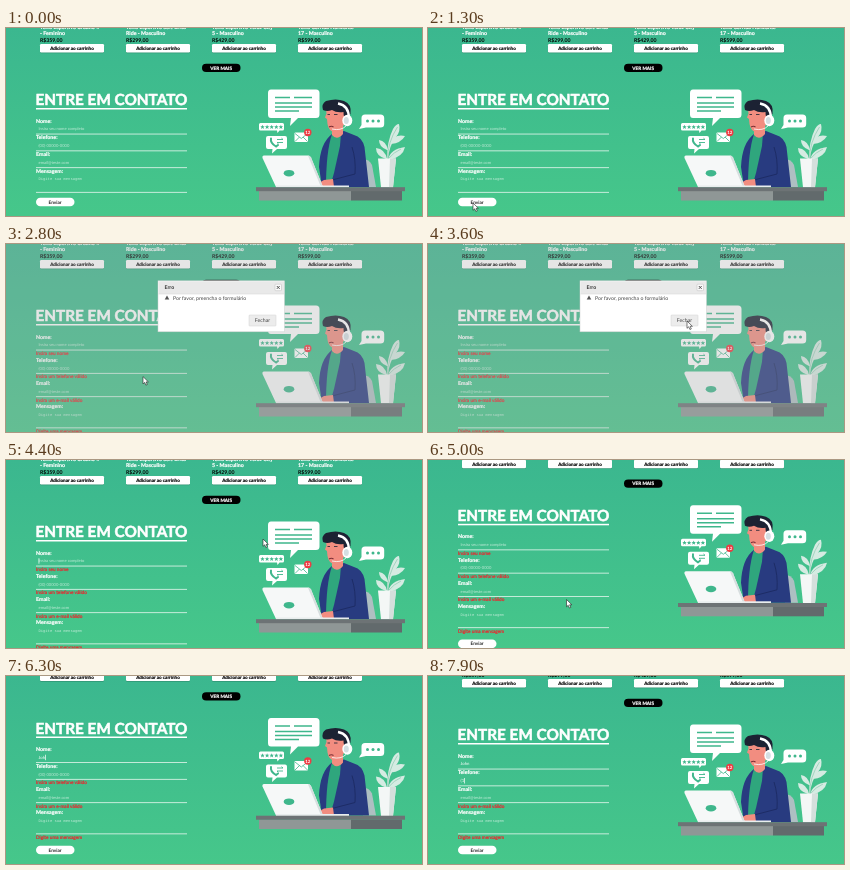
Write an HTML page that moves like this. It is 416 px wide and 188 px high and loops after 8000 ms.

```html
<!DOCTYPE html>
<html lang="pt-BR">
<head>
<meta charset="utf-8">
<title>Entre em contato</title>
<style>
  html, body { margin: 0; height: 100%; overflow: hidden; }
  svg { display: block; width: 416px; height: 188px; font-family: Lato, sans-serif; text-rendering: geometricPrecision; }
  .b { font-weight: 700; }
  .mid { text-anchor: middle; }
  .white { fill: #fff; }
  .green { fill: #3fb78c; }
  .skin { fill: #f28d80; }
  .navy { fill: #283b80; }
  .hair { fill: #1c2233; }
  .title { fill: #fff; stroke: #fff; stroke-width: .55; font-size: 15.3px; font-weight: 700; }
  .hint { fill: #bfead7; font-size: 4.1px; }
  .typed { fill: #fff; font-size: 4.3px; }
  .error { fill: #f0222b; stroke: #f0222b; stroke-width: .2; font-size: 4.75px; }
  .label { fill: #fff; stroke: #fff; stroke-width: .2; font-size: 5.3px; font-weight: 700; }
  .mono { font: 3.8px "Liberation Mono", monospace; }
</style>
</head>
<body>
<svg viewBox="0 0 416 188">
  <defs>
    <linearGradient id="bg" x2="0" y2="1">
      <stop stop-color="#3bb78f"/><stop offset="1" stop-color="#46c78a"/>
    </linearGradient>
  </defs>
  <rect width="416" height="188" fill="url(#bg)"/>

  <g id="page">
    <g id="products"></g>
    <rect x="196" y="35.7" width="38.5" height="8.3" rx="4.1"/>
    <text class="b mid white" x="215.2" y="41.6" font-size="4.7" stroke="#fff" stroke-width=".2">VER MAIS</text>
    <text class="title" x="29.5" y="77">ENTRE EM CONTATO</text>
    <rect class="white" x="30" y="80" width="151" height="1.5"/>

    <g id="art">
      <!-- chat bubbles -->
      <path class="white" d="M265 61.5h45q3.5 0 3.500 3.500v21.500q0 3.500-3.500 3.500h-18l-8 8 1-8h-20q-3 0-3-3.500V65q0-3.500 3-3.500z"/>
      <path d="M269 69.500h15m4 0h18M269 75h37M269 79h37M269 83h24" stroke="#3fb78c" stroke-width="1.600" fill="none"/>
      <path class="white" d="M254.500 95h22q1.500 0 1.500 1.500v4.500q0 1.500-1.500 1.500h-3l-2 2.500-.5-2.500h-16.500q-1.500 0-1.500-1.500v-4.500q0-1.500 1.500-1.500z"/>
      <g id="stars" class="green"></g>
      <path class="white" d="M262 108h17q2 0 2 2v9q0 2-2 2h-8l-5 4.500.5-4.500h-4.500q-2 0-2-2v-9q0-2 2-2z"/>
      <path d="M265 110.500q-1 4.500 5 8l2-1.500" fill="none" stroke="#3fb78c" stroke-width="2" stroke-linecap="round"/>
      <path d="M271 111.500h6l-1.500-1.300M277 114.500h-6l1.500 1.300" fill="none" stroke="#3fb78c" stroke-width=".9"/>
      <rect class="white" x="288.500" y="104.500" width="13.500" height="9.500" rx="1"/>
      <path d="M289 105.500l6.300 5 6.300-5M289 113.500l4.500-4.500M301.500 113.500l-4.500-4.500" fill="none" stroke="#3fb78c" stroke-width=".8"/>
      <circle cx="301.800" cy="104.500" r="3.700" fill="#ed3b43"/>
      <text class="b mid white" x="301.800" y="106.100" font-size="4.400">12</text>
      <path class="white" d="M359 86.500h15.500q3.700 0 3.700 3.500v6q0 3.500-3.700 3.500H360l-7 1.500 2.500-4v-7q0-3.500 3.500-3.500z"/>
      <g class="green"><circle cx="361.500" cy="93" r="1.500"/><circle cx="367" cy="93" r="1.500"/><circle cx="372.500" cy="93" r="1.500"/></g>

      <!-- chair and plant -->
      <path fill="#aebfc2" d="M354 131q9-1 12 6l4 22h-13z"/>
      <g fill="#d5ebe2">
        <path d="M381 131q0-18 6-30 3-5 6-5 2 7-3 13-7 9-8 22z"/>
        <path d="M382 132q2-11 17-13-2 10-16 13z"/>
        <path d="M380 131q-10-3-10-11 9 1 11 11z"/>
        <path d="M381 122q-8-3-8-10 7 1 9 10z"/>
        <path d="M385 114q3-8 14-6-4 7-14 8z"/>
      </g>
      <path d="M381.500 132q0-18 10-33M382 131q6-7 13-10" fill="none" stroke="#8fc9b1" stroke-width=".7"/>
      <path d="M372 130.500h18l-3 29h-12z" fill="#f4f7f6"/>
      <path d="M384 130.500h6l-3 29h-4z" fill="#d5dfdc"/>

      <!-- person -->
      <path class="navy" d="M326 106l12-3 10 4q8 2 10.500 12l4.500 40h-47l-3-20q1-24 13-33z"/>
      <path fill="#2fa67d" d="M326 106l9-1-1 13-6 27-4 14h-4q0-35 6-53z"/>
      <path class="skin" d="M326 98h11v8q-6 7-11 1z"/>
      <path class="skin" d="M320 81h19.500v12q-4 11-11 11-6-1-7-8l-.5-5-2-1.500 1.500-4z"/>
      <path class="hair" d="M317 82q-2-6 3-9 10-3 18 0 8 3 6.500 13l-4.500 5q-2.500-1-2.500-7-7 1-11.500-2-5 2-9 0z"/>
      <path d="M323 99q2.500-1.500 4.500 0" fill="none" stroke="#7c2f35" stroke-width="1.100"/>
      <path d="M321.500 86.500h2.500m4 0h3.500" stroke="#1c2233" stroke-width=".8"/>
      <path d="M332 75.500q11 2 11 15" fill="none" stroke="#fff" stroke-width="2.300"/>
      <ellipse class="white" cx="341.300" cy="92.500" rx="5" ry="5.700"/>
      <ellipse cx="340.300" cy="92.500" rx="2.500" ry="3.500" fill="#d4dfe3"/>
      <path d="M340 98q-5 5-14 3" fill="none" stroke="#fff" stroke-width=".8"/>
      <path d="M346 119q4 12 3 27l-23 6" fill="none" stroke="#1d2c66" stroke-width="1"/>
      <path class="skin" d="M327 151l-9 1-7 4v3h17z"/>

      <!-- laptop and desk -->
      <path fill="#f6f8f8" d="M258 127.500h44q2 0 3 2l12 29.500h-47l-13.500-29q-.5-2.500 1.500-2.500z"/>
      <path fill="#d7dedf" d="M302 127.500q2 0 3 2l12 29.500h-2l-12.500-30z"/>
      <ellipse class="green" cx="283" cy="145.200" rx="5.300" ry="3.300"/>
      <rect fill="#e9eeee" x="270" y="157.500" width="73" height="2"/>
      <rect fill="#8f9796" x="253" y="163" width="92" height="9.500"/>
      <rect fill="#626a6c" x="345" y="163" width="51" height="9.500"/>
      <rect fill="#6d7375" x="250" y="159.200" width="149" height="4"/>
    </g>

    <g id="form"></g>
    <g id="send">
      <rect class="white" x="30" y="169.700" width="38.500" height="8.600" rx="4.300"/>
      <text class="b mid" x="49" y="175.600" font-size="4.700" fill="#222">Enviar</text>
    </g>
    <rect id="caret" class="white" width=".7" height="5.500"/>
  </g>

  <g id="modal">
    <rect width="416" height="188" fill="#aaa" opacity=".3"/>
    <rect x="152" y="36.800" width="126.500" height="51" fill="#fff" stroke="#c9cfcd" stroke-width=".5"/>
    <rect x="152.500" y="37.300" width="125.500" height="12.700" fill="#e9e9e9"/>
    <path d="M152.500 50h125.500" stroke="#d2d2d2" stroke-width=".5"/>
    <text class="b" x="158.500" y="45.300" font-size="5.200" fill="#333">Erro</text>
    <rect x="269" y="40.200" width="6.500" height="6.500" rx=".8" fill="#fafafa" stroke="#bbb" stroke-width=".5"/>
    <g id="icons">
      <path d="M270.800 42l2.900 2.900m0-2.900l-2.900 2.900" stroke="#444" stroke-width=".9"/>
      <path d="M161 51.500l2.300 4h-4.600z" fill="#555"/>
    </g>
    <text x="167" y="56.200" font-size="5.200" fill="#444">Por favor, preencha o formulário</text>
    <rect x="243" y="71" width="27" height="11" rx=".8" fill="#ececec" stroke="#d0d0d0" stroke-width=".5"/>
    <text class="mid" x="256.500" y="78.300" font-size="5.200" fill="#444">Fechar</text>
  </g>

  <path id="arrow" d="M0 0v7.300l1.700-1.500 1.200 2.700 1.400-.6-1.200-2.600h2.300z" fill="#fff" stroke="#222" stroke-width=".6"/>
</svg>
<script>
const LOOP = 8000, STEP = 100, ERROR_HEIGHT = 6.5, BLINK = 530;
const OPENED = 1900, CLOSED = 4000;
const $ = id => document.getElementById(id);
const text = (x, y, cls, str = '') => `<text x="${x}" y="${y}" class="${cls}">${str}</text>`;

const products = [
  ['Tênis Esportivo Urbano 4', '- Feminino', '359'],
  ['Tênis Esportivo Soft Brisa', 'Ride - Masculino', '299'],
  ['Tênis Esportivo Veloz City', '5 - Masculino', '429'],
  ['Tênis Corrida Horizonte', '17 - Masculino', '599'],
];
$('products').innerHTML = products.map(([name, kind, price], i) => `
  <g transform="translate(${34 + 86 * i})">
    ${text(0, 0.7, 'label', name)}${text(0, 7.2, 'label', kind)}
    <text class="b" y="13.7" font-size="5.2">R$${price},00</text>
    <rect y="16.8" width="64" height="8.4" rx="1.2" opacity=".2"/>
    <rect class="white" y="16" width="64" height="8.5" rx="1.2"/>
    <text class="b mid" x="32" y="22" font-size="4.6" stroke="#000" stroke-width=".15">Adicionar ao carrinho</text>
  </g>`).join('');

const star = 'M0-2.200l.6 1.500h1.600l-1.200 1 .5 1.600-1.500-1-1.500 1 .5-1.600-1.200-1h1.600z';
$('stars').innerHTML = [0, 1, 2, 3, 4].map(i =>
  `<path d="${star}" transform="translate(${256.5 + 4.6 * i} 99)"/>`).join('');

// top: offset from the first field; line: position of the underline
const fields = [
  { top: 0, line: 106, label: 'Nome:', hint: 'Insira seu nome completo', error: 'Insira seu nome' },
  { top: 16.8, line: 106, label: 'Telefone:', hint: '(00) 00000-0000', error: 'Insira um telefone válido' },
  { top: 33.6, line: 106, label: 'Email:', hint: 'email@teste.com', error: 'Insira um e-mail válido' },
  { top: 50, line: 114.3, label: 'Mensagem:', hint: 'Digite sua mensagem', error: 'Digite uma mensagem' },
];
$('form').innerHTML = fields.map((f, i) => `
  <g>
    ${text(30, 94.7, 'label', f.label)}
    ${text(32.5, 102.3, i === 3 ? 'hint mono' : 'hint', f.hint)}
    ${text(32.5, 102.4, 'typed')}
    <rect x="30" y="${f.line - 0.4}" width="151" height=".9" fill="#d3f0e3"/>
    ${text(30, f.line + 5, 'error', f.error)}
  </g>`).join('');
fields.forEach((f, i) => {
  f.node = $('form').children[i];
  for (const part of ['hint', 'typed', 'error']) f[part] = f.node.querySelector('.' + part);
});

const show = (node, on) => node.setAttribute('visibility', on ? 'inherit' : 'hidden');
const move = (node, x, y) => node.setAttribute('transform', `translate(${x} ${y})`);

// Interpolates [time, ...values] keys
function track(keys, t) {
  if (t <= keys[0][0]) return keys[0].slice(1);
  const i = keys.findIndex(k => k[0] > t);
  if (i < 0) return keys.at(-1).slice(1);
  const a = keys[i - 1], b = keys[i], p = (t - a[0]) / (b[0] - a[0]);
  return a.slice(1).map((v, j) => v + (b[j + 1] - v) * p);
}

const pointer = [
  [500, -6, 112], [900, 30, 146], [1300, 45, 175], [2400, 45, 175], [2900, 160, 122],
  [3300, 259, 77], [3700, 259, 77], [4400, 257, 79], [4600, 240, 88], [5000, 138.5, 139.5],
  [5400, 80, 100], [5700, 46, 75],
];
const wheel = [[4600, 0], [4800, 4], [5000, 16.2], [5300, 4 * ERROR_HEIGHT]];
const keystrokes = [
  [[6000, 'J'], [6100, 'Jo'], [6300, 'Joh'], [6500, 'John']],
  [[7700, '('], [7800, '(1']],
];
const typedAt = (i, t) => (keystrokes[i] || []).reduce((s, [at, v]) => t >= at ? v : s, '');

function draw(t) {
  const submitted = t >= OPENED;
  let shift = 0;
  fields.forEach((f, i) => {
    const value = typedAt(i, t), invalid = submitted && !value;
    f.y = f.top + shift;
    move(f.node, 0, f.y);
    f.typed.textContent = value;
    show(f.hint, !value);
    show(f.error, invalid);
    if (invalid) shift += ERROR_HEIGHT;
  });
  move($('send'), 0, shift);
  move($('page'), 0, -Math.min(track(wheel, t)[0], shift));

  const active = fields[t < 7000 ? 0 : 1];
  const width = active.typed.textContent ? active.typed.getComputedTextLength() : 0;
  move($('caret'), 32.6 + width, active.y + 98.2);
  const lastKey = keystrokes.flat().reduce((s, [at]) => t >= at ? at : s, CLOSED);
  show($('caret'), t >= CLOSED && (t - lastKey) % (2 * BLINK) < BLINK);

  show($('modal'), submitted && t < CLOSED);
  show($('icons'), t >= OPENED + 200);
  move($('arrow'), ...track(pointer, t));
  show($('arrow'), t >= 500 && t < 6000);
}

function frame() {
  draw(Math.floor(performance.now() % LOOP / STEP) * STEP);
  requestAnimationFrame(frame);
}
frame();
</script>
</body>
</html>
```
